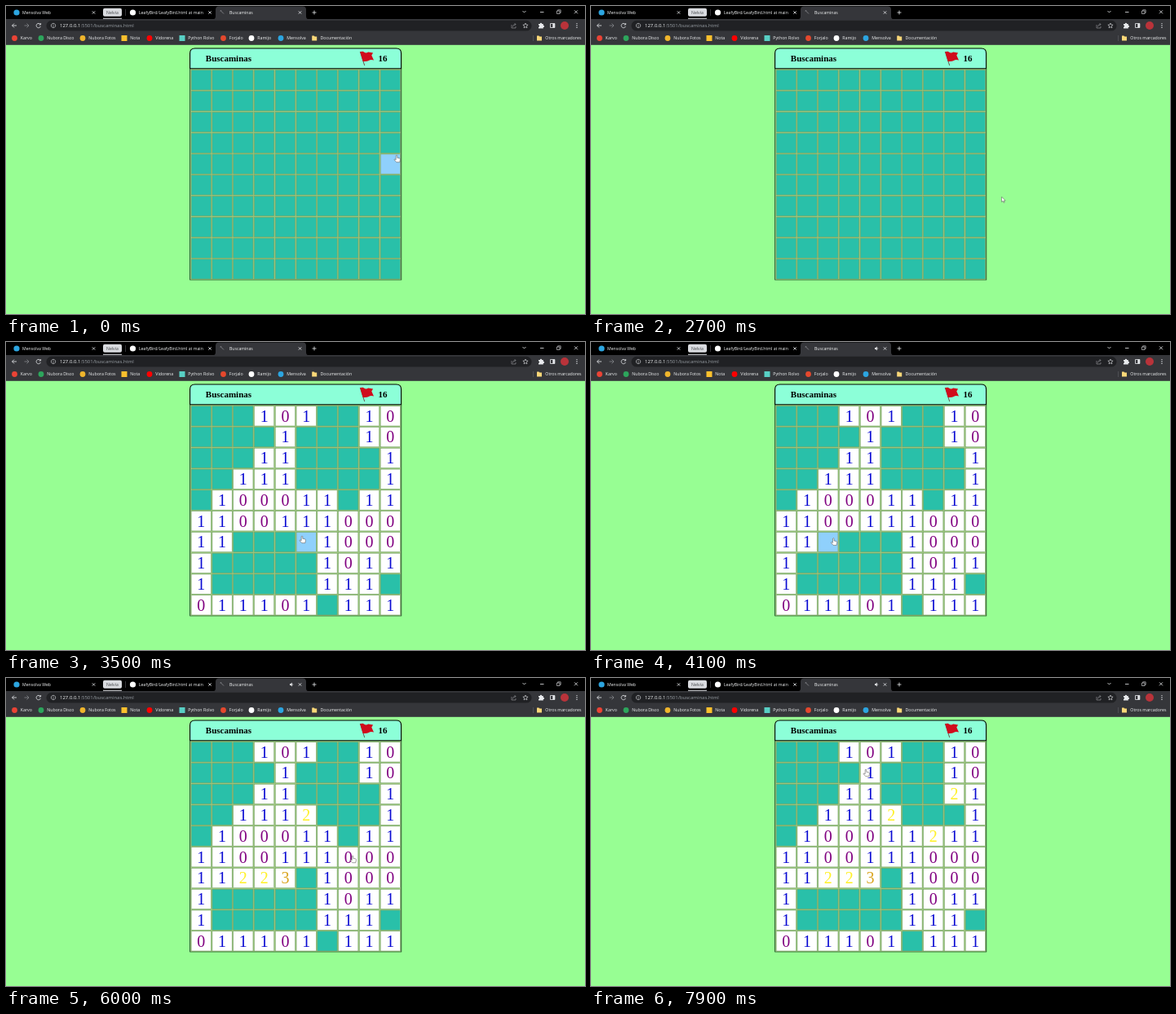
Write an HTML page that moves like this. It is 710 px wide and 378 px high and loops after 8 s.

```html
<!DOCTYPE html>
<html lang="es">
<head>
<meta charset="utf-8">
<title>Buscaminas</title>
<style>
html, body { margin: 0; width: 100%; height: 100%; overflow: hidden; background: #97fe93; }
svg { display: block; width: 710px; height: 378px; }
.ui { font-family: "Open Sans", "Noto Sans", sans-serif; font-size: 5.25px; }
.tab { font-size: 5.15px; }
.url { font-size: 6px; }
.title { font: bold 11px "Liberation Serif", serif; }
.digit { font: 20px "Liberation Serif", serif; text-anchor: middle; }
</style>
</head>
<body>
<svg id="stage" viewBox="0 0 710 378"></svg>
<script>
const LOOP = 8000, STEP = 100, OPEN_DELAY = 200;
const LEFT = 226.4, TOP = 78, PITCH = 25.78, SIZE = 10;
const COLORS = ['#800080', '#0a0ad2', '#fff12a', '#daa520'];
const COVERED = '#29c0a9', HOVER = '#8fd0fc';

// row and column of each mine
const MINES = new Set('02 16 17 20 22 25 36 38 40 65 71 73 74 82 89 96'.split(' '));

const stop = (at, x, y, click = false) => ({ at, x, y, click });
const STOPS = [
  stop(0, 479, 183), stop(1500, 541, 232), stop(2100, 557, 238),
  stop(3300, 351, 223, true), stop(3500, 363, 238),
  stop(4200, 290, 241, true), stop(4400, 309, 241, true),
  stop(5100, 340, 240, true), stop(5300, 364, 165, true),
  stop(5700, 378, 106), stop(6000, 425, 218),
  stop(6200, 418, 190, true), stop(7000, 444, 140, true),
  stop(7500, 379, 160), stop(7900, 337, 112)
];

const stage = document.getElementById('stage');

function add(tag, attrs, text, parent = stage) {
  const node = document.createElementNS('http://www.w3.org/2000/svg', tag);
  for (const key in attrs) node.setAttribute(key, attrs[key]);
  if (text !== undefined) node.textContent = text;
  return parent.appendChild(node);
}
const rect = (x, y, width, height, fill, rx = 0) => add('rect', { x, y, width, height, fill, rx });
const dot = (cx, cy, r, fill) => add('circle', { cx, cy, r, fill });
const shape = (d, fill) => add('path', { d, fill });
const line = (d, width = .8, stroke = '#e8eaed') =>
  add('path', { d, stroke, fill: 'none', 'stroke-width': width });
const label = (x, y, text, kind = '', fill = '#f1f3f4') =>
  add('text', { x, y, class: 'ui ' + kind, fill }, text);
const cross = (x, y, r) => line(`M${x - r} ${y - r}l${2 * r} ${2 * r}m0 ${-2 * r}l${-2 * r} ${2 * r}`);

function drawTabs() {
  rect(0, 0, 710, 16.5, '#000');
  dot(13, 8, 3.6, '#2ca5e0');
  label(20, 9.8, 'Mensolva Web', 'tab');
  rect(119, 2.8, 23, 10, '#dadce0', 2);
  label(123, 9.7, 'Nelvia', 'tab', '#45474b');
  rect(119, 14.8, 23, 1, '#dadce0');
  rect(146, 4, .6, 8, '#55575c');
  dot(155.5, 8, 3.6, '#fff');
  label(163, 9.8, 'LeafyBird/LeafyBird.html at main', 'tab');
  shape('M253 16.5q4 0 4-4v-8q0-4 4-4h103q4 0 4 4v8q0 4 4 4z', '#35363a');
  line('M263 5.5l4 4m-3-4.5l-1 1.5', .8, '#8d8f94');
  label(274, 9.8, 'Buscaminas', 'tab');
  for (const x of [107.5, 250, 360.5]) cross(x, 8, 1.7);
  line('M375.5 8h5m-2.5-2.5v5');
  line('M633.5 6l2 2 2-2');
  line('M655 7.5h4.5');
  line('M675.5 6h3.5v3.5h-3.5zm1.2 0v-1.2h3.5v3.5h-1.2', .6);
  cross(699, 7.3, 2);
}

function drawToolbar() {
  rect(0, 16, 710, 31.8, '#35363a');
  line('M13 24H7.5m2.5-2.5l-2.5 2.5 2.5 2.5');
  line('M22.5 24H28m-2.5-2.5l2.5 2.5-2.5 2.5', .8, '#85878b');
  line('M42 22.4A2.7 2.7 0 1 0 42.4 25M42.6 21v2h-2');
  rect(49.5, 17.8, 595, 12.8, '#202124', 6.4);
  line('M58 21.3a2.7 2.7 0 1 0 .1 0m-.1 2.3v2m0-3.2v.6', .6);
  const url = label(66, 26.1, '127.0.0.1', 'url');
  add('tspan', { fill: '#9aa0a6' }, ':5501/buscaminas.html', url);
  line('M620 23v4h5v-2m-3.5.5q0-3 3.5-3m-1.5-1.5l1.5 1.5-1.5 1.5', .5, '#b4b6ba');
  line('M637 21l.9 2 2.2.2-1.7 1.5.5 2.2-1.9-1.2-1.9 1.2.5-2.2-1.7-1.5 2.2-.2z', .6);
  shape('M653 22h1.8a1.2 1.2 0 0 1 2.4 0h1.6v1.7a1.2 1.2 0 0 1 0 2.4v1.4h-5.8v-1.7a1.1 1.1 0 0 0 0-2.2z', '#e8eaed');
  line('M667.5 21.5h5.4v5h-5.4z');
  rect(670.4, 21.5, 2.5, 5, '#e8eaed');
  dot(685, 24, 5, '#b9333a');
  for (const y of [21.6, 24, 26.4]) dot(700, y, .7, '#e8eaed');
}

function bookmark(x, text, icon) {
  icon(x);
  label(x + 7.3, 41.3, text);
}
const round = color => x => dot(x, 39.5, 3.4, color);
const square = color => x => rect(x - 3.5, 36, 7, 7, color);
const folder = x => shape(`M${x - 3} 36.5h2.5l1 1h2.5v5h-6z`, '#f9d778');

function drawBookmarks() {
  bookmark(10.5, 'Karvo', round('#ea4335'));
  bookmark(43, 'Nubora Disco', round('#2da55c'));
  bookmark(94, 'Nubora Fotos', round('#efb52c'));
  bookmark(145, 'Nota', square('#fbc02d'));
  bookmark(176, 'Vidorena', round('#f00'));
  bookmark(216, 'Python Rolvo', square('#58cfc4'));
  bookmark(266.5, 'Forjalo', round('#e5482d'));
  bookmark(301, 'Ramijo', round('#fff'));
  bookmark(337, 'Mensolva', round('#2ca5e0'));
  bookmark(378.2, 'Documentación', folder);
  rect(646, 36, .6, 7, '#606166');
  bookmark(654, 'Otros marcadores', folder);
}

function drawHeader() {
  add('path', {
    d: 'M225.6 76.8V58q0-6 6-6h247q6 0 6 6v18.8z',
    fill: '#8cffd8', stroke: '#000', 'stroke-width': 1.1
  });
  add('text', { x: 244.8, y: 68, class: 'title' }, 'Buscaminas');
  add('text', { x: 456.6, y: 68, class: 'title' }, '16');
  line('M434.3 56l5.4 17', .8, '#5d2b2b');
  shape('M434.3 56.5q3-1.6 5 .2t5-.3l5.8 1-1.8 3 2.7 6q-4.2-.8-6.2.6t-7.2 1z', '#d00c1c');
}

function countMines(row, col) {
  let count = 0;
  for (let r = row - 1; r <= row + 1; r++)
    for (let c = col - 1; c <= col + 1; c++) count += MINES.has(`${r}${c}`);
  return count;
}

function makeCell(row, col) {
  const x = LEFT + col * PITCH, y = TOP + row * PITCH, value = countMines(row, col);
  const box = add('rect', {
    x: x + .8, y: y + .8, width: PITCH - 1.6, height: PITCH - 1.6,
    stroke: '#6f9f62', 'stroke-width': .5
  });
  const digit = add('text', {
    x: x + PITCH / 2, y: y + 19.6, class: 'digit', fill: COLORS[Math.min(value, 3)]
  }, value);
  return { row, col, value, box, digit, opens: Infinity };
}

function drawBoard() {
  const side = SIZE * PITCH;
  rect(LEFT - 1.2, TOP - 1, side + 2.2, side + 1.6, '#153c20');
  rect(LEFT - .4, TOP - .6, side + .6, side + .6, '#9cc47c');
  return Array.from({ length: SIZE * SIZE }, (_, i) => makeCell(Math.floor(i / SIZE), i % SIZE));
}

function cellIndex(x, y) {
  const col = Math.floor((x - LEFT) / PITCH), row = Math.floor((y - TOP) / PITCH);
  const inside = Math.min(col, row) >= 0 && Math.max(col, row) < SIZE;
  return inside ? row * SIZE + col : -1;
}

// Opening spreads sideways through cells that touch at most one mine.
function openCell(cell, time) {
  if (!cell || cell.opens <= time || MINES.has(`${cell.row}${cell.col}`)) return;
  cell.opens = time;
  if (cell.value > 1) return;
  for (const other of cells) {
    const distance = Math.abs(other.row - cell.row) + Math.abs(other.col - cell.col);
    if (distance === 1 && other.value < 2) openCell(other, time);
  }
}

function pointerAt(t) {
  const next = STOPS.findIndex(s => s.at > t);
  if (next < 0) return STOPS[STOPS.length - 1];
  const a = STOPS[next - 1], b = STOPS[next];
  const travel = Math.min(b.at - a.at, 900, 7 * Math.hypot(b.x - a.x, b.y - a.y));
  const p = Math.max(0, 1 - (b.at - t) / travel);
  const ease = p * p * (3 - 2 * p);
  return { x: a.x + (b.x - a.x) * ease, y: a.y + (b.y - a.y) * ease };
}

rect(0, 0, 710, 378, '#97fe93');
drawTabs();
drawToolbar();
drawBookmarks();
drawHeader();
const cells = drawBoard();
const clicks = STOPS.filter(s => s.click);
for (const { x, y, at } of clicks) openCell(cells[cellIndex(x, y)], at + OPEN_DELAY);

const sound = shape('M348 7h1.2l1.6-1.5v5l-1.6-1.5h-1.2zm3.6-.2q1.4 1.2 0 2.4z', '#e4e5e8');
const outline = { fill: '#fff', stroke: '#444', 'stroke-width': .5, 'stroke-linejoin': 'round' };
const arrow = add('path', { d: 'M0 0v6.4l1.5-1.3 1 2.2 1-.4-.9-2.1h2z', ...outline });
const hand = add('path', {
  d: 'M-.8.6q.8-1.2 1.6 0v2.7l2.8.6q1 .3.8 1.5l-.6 3.3h-4L-2.8 5.8q-.2-1 .8-.8l1.2.7z', ...outline
});

const show = (node, on) => node.setAttribute('visibility', on ? 'visible' : 'hidden');

function render(now) {
  const t = Math.floor((now % LOOP) / STEP) * STEP;
  const { x, y } = pointerAt(t);
  const hovered = cellIndex(x, y);
  cells.forEach((cell, i) => {
    const open = t >= cell.opens;
    cell.box.setAttribute('fill', open ? '#fff' : i === hovered ? HOVER : COVERED);
    show(cell.digit, open);
  });
  show(sound, t > clicks[0].at + OPEN_DELAY);
  show(hand, hovered >= 0);
  show(arrow, hovered < 0);
  (hovered >= 0 ? hand : arrow).setAttribute('transform', `translate(${x} ${y})`);
}

const start = performance.now();
function tick() {
  render(performance.now() - start);
  requestAnimationFrame(tick);
}
tick();
</script>
</body>
</html>
```
